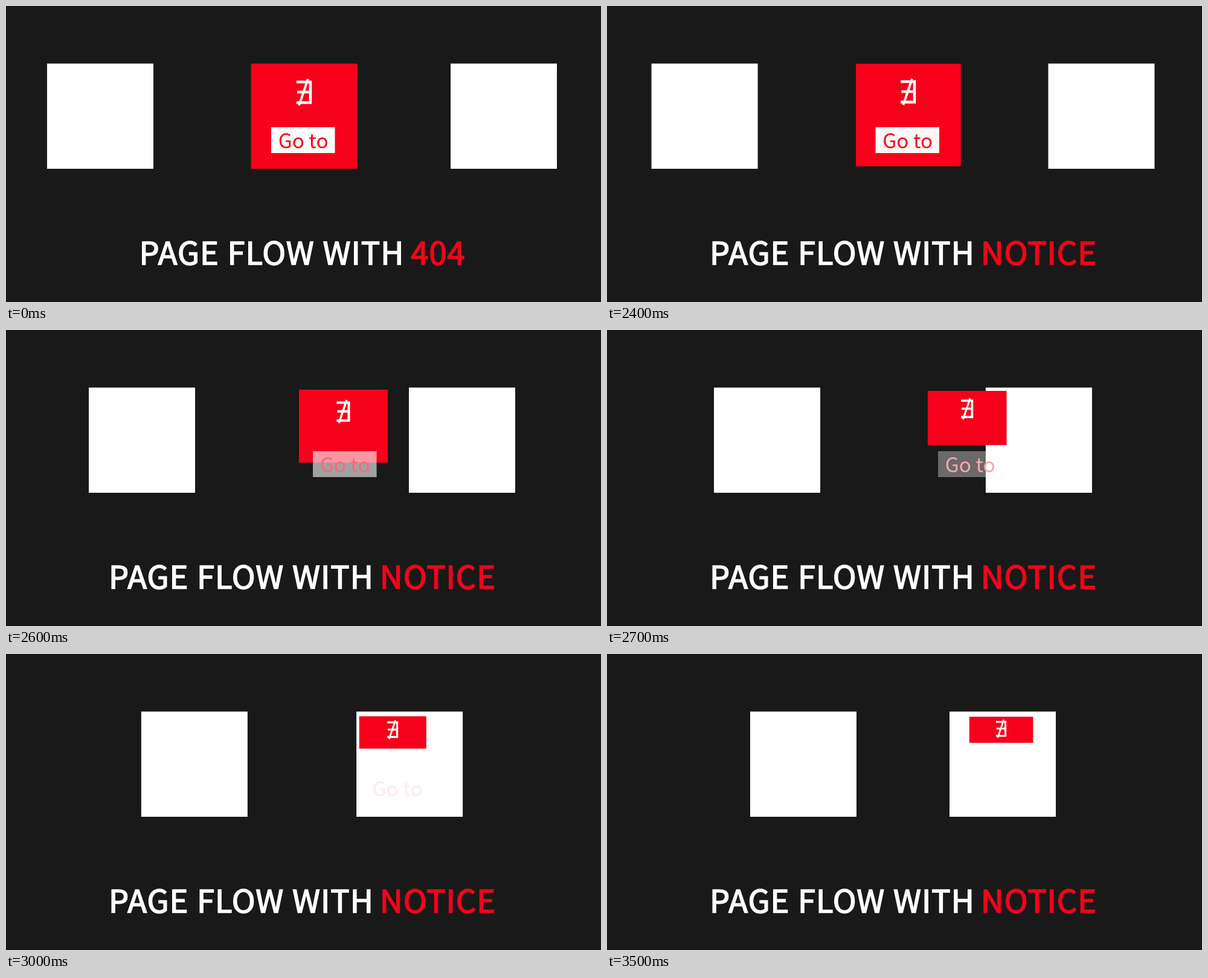
These frames come from a looping animation (985 px wide and 491 px high, 5900 ms). An HTML page with a canvas:

```html
<!DOCTYPE html>
<html lang="en">
<head>
<meta charset="utf-8">
<title>Page flow</title>
<style>
html, body { margin: 0; width: 100%; height: 100%; overflow: hidden; background: #191919; }
canvas { display: block; width: 985px; height: 491px; }
</style>
</head>
<body>
<canvas id="stage" width="985" height="491"></canvas>
<script>
const ctx = document.getElementById('stage').getContext('2d');
const LOOP = 5900, STEP = 100, SWITCH = 2300;
const RED = [246, 0, 27];
const FAMILY = '"Noto Sans CJK JP", "Noto Sans CJK SC", "Noto Sans CJK", "Noto Sans", sans-serif';
const TITLE = `400 52.4px ${FAMILY}`;
const LABEL = `400 33.33px ${FAMILY}`;
const WEIGHT = 1.6; // outline that thickens the title

// time in ms -> progress along the easing curve
const CLOCK = [[2300, 0], [2400, 0.05], [2500, 0.116], [2600, 0.25],
  [2800, 0.5], [3000, 0.662], [3300, 0.96], [3400, 0.96], [3500, 1]];

const lerp = (a, b, p) => a + (b - a) * p;
const rgb = c => `rgb(${c.map(Math.round).join(',')})`;

function clock(t) {
  if (t < CLOCK[0][0]) return 0;
  for (let i = 1; i < CLOCK.length; i++) {
    const [t0, u0] = CLOCK[i - 1], [t1, u1] = CLOCK[i];
    if (t <= t1) return lerp(u0, u1, (t - t0) / (t1 - t0));
  }
  return 1;
}

// cubic-bezier(.25, .1, .25, 1)
function ease(u) {
  if (u <= 0 || u >= 1) return u;
  let lo = 0, hi = 1;
  for (let i = 0; i < 30; i++) {
    const s = (lo + hi) / 2;
    if (0.75 * s - 0.75 * s * s + s ** 3 < u) lo = s; else hi = s;
  }
  return 0.3 * lo + 2.4 * lo * lo - 1.7 * lo ** 3;
}

function rect(x, y, w, h, color) {
  ctx.fillStyle = color;
  ctx.fillRect(x, y, w, h);
}

// places text by the left edge of its first letter
function text(str, left, base, color, bold = 0) {
  ctx.fillStyle = ctx.strokeStyle = color;
  const x = left + ctx.measureText(str).actualBoundingBoxLeft + bold / 2;
  ctx.fillText(str, x, base);
  if (bold) {
    ctx.lineWidth = bold;
    ctx.lineJoin = 'miter';
    ctx.miterLimit = 3;
    ctx.strokeText(str, x, base);
  }
}

function title(t) {
  const first = t < SWITCH;
  const x = first ? 224.7 : 174.2;
  const base = 428.7;
  ctx.font = TITLE;
  ctx.letterSpacing = '1px';
  ['PAGE', 'FLOW', 'WITH'].forEach((word, i) =>
    text(word, x + [0, 146, 300][i], base, '#fff', WEIGHT));
  text(first ? '404' : 'NOTICE', first ? 670.5 : 623, base, rgb(RED), WEIGHT);
  ctx.letterSpacing = '0px';
}

function symbol(x, y, scale) {
  ctx.save();
  ctx.translate(x, y);
  ctx.scale(scale, scale);
  ctx.strokeStyle = '#fff';
  ctx.lineWidth = 4.6;
  ctx.beginPath();
  ctx.moveTo(-12.8, -17);
  ctx.lineTo(10.3, -17);
  ctx.lineTo(10.3, 17.2);
  ctx.lineTo(-12.8, 17.2);
  ctx.moveTo(-11.5, -0.3);
  ctx.lineTo(10.3, -0.3);
  ctx.stroke();
  ctx.lineWidth = 3.9;
  ctx.beginPath();
  ctx.moveTo(6.3, -22);
  ctx.lineTo(-8.5, 22);
  ctx.stroke();
  ctx.restore();
}

function draw(t) {
  const p = ease(clock(t));
  const shift = 169 * p;
  rect(0, 0, 985, 491, '#191919');

  rect(68 + shift, 95.5, 176, 174.5, '#fff');
  rect(736 - shift, 95.5, 176, 174.5, '#fff');

  const x = lerp(405.6, 599.8, p), w = lerp(176, 105.6, p);
  rect(x, lerp(95.5, 104, p), w, lerp(174.5, 43.4, p), rgb(RED));
  symbol(x + w / 2, lerp(143, 124, p), lerp(1, 0.68, p));

  // button background fades out while its label turns white
  rect(439 + shift, 201, 105.5, 43, `rgba(255,255,255,${1 - p})`);
  ctx.font = LABEL;
  text('Go to', 451.7 + shift, 236, rgb(RED.map(c => lerp(c, 255, p))));

  title(t);
}

function tick() {
  const t = performance.now() % LOOP;
  draw(Math.floor(t / STEP) * STEP);
  requestAnimationFrame(tick);
}
tick();
</script>
</body>
</html>
```
